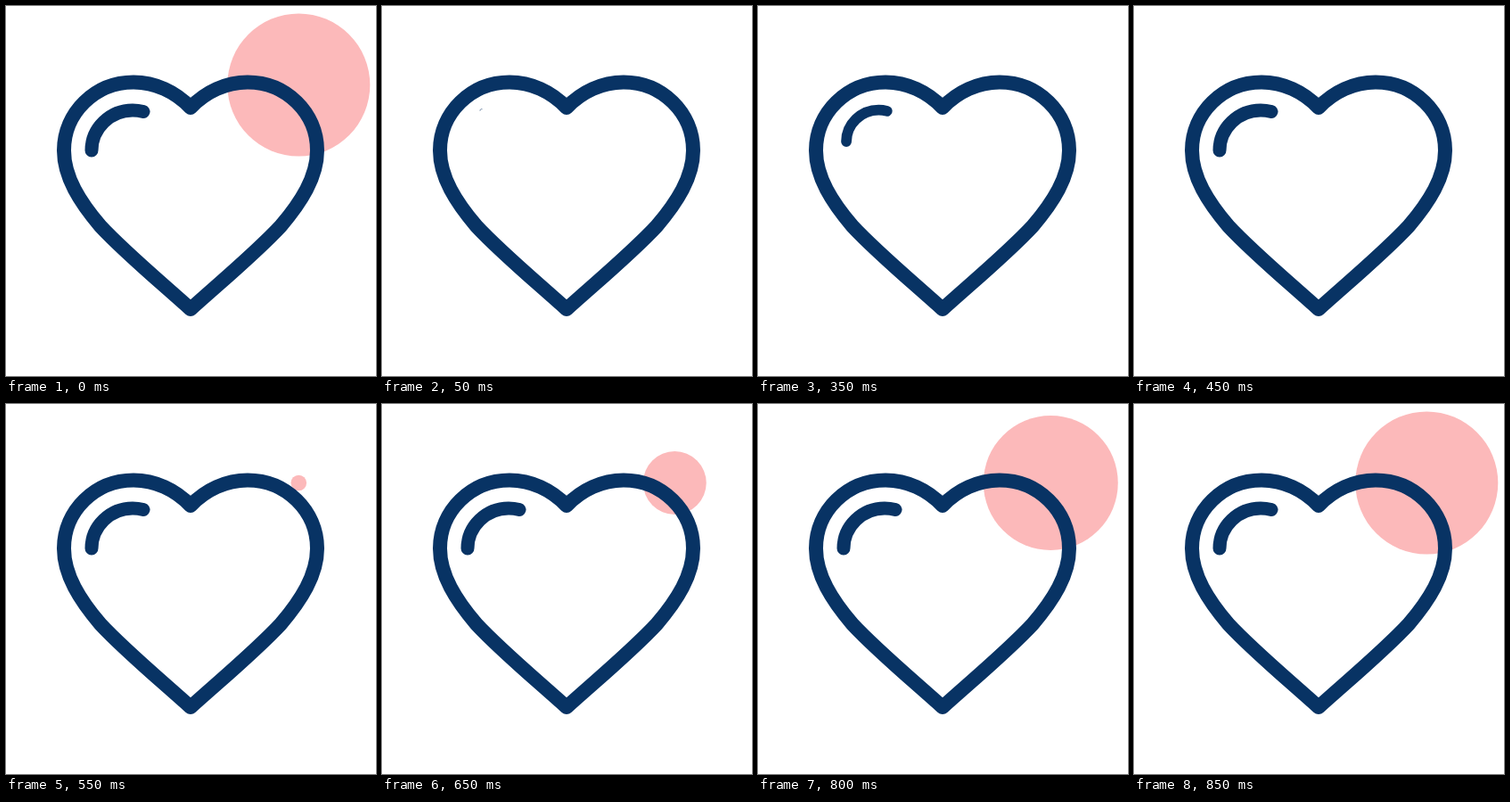
These frames come from a looping animation (415 px wide and 415 px high, 0.9 s). An HTML page with a canvas:

```html
<!DOCTYPE html>
<html lang="en">
<head>
<meta charset="utf-8">
<title>Heart</title>
<style>
  html, body { margin: 0; width: 100%; height: 100%; overflow: hidden; background: #fff; }
  canvas { display: block; width: 415px; height: 415px; }
</style>
</head>
<body>
<canvas id="stage" width="415" height="415"></canvas>
<script>
const ctx = document.getElementById('stage').getContext('2d');
const LOOP = 900, STEP = 50;
const NAVY = '#083364', PINK = '#fcb9ba';
const AXIS = 207;

const heartHalf = new Path2D(
  'M207 114 C190 96 167 85.5 143 85.5 C100 85.5 65 119.7 65 162 ' +
  'C65 192 83 220 106 247 C133 276 168 305 207 340');
const heart = new Path2D(heartHalf);
heart.addPath(heartHalf, new DOMMatrix([-1, 0, 0, 1, 2 * AXIS, 0]));

const shine = new Path2D('M96 162 C96 137 117 117 142 117 Q148 117 154 118.5');
const shineOrigin = { x: 110.5, y: 115.5 };

const progress = (t, start, duration) =>
  Math.min(1, Math.max(0, (t - start) / duration));

function strokePath(path, width) {
  ctx.strokeStyle = NAVY;
  ctx.lineWidth = width;
  ctx.lineCap = ctx.lineJoin = 'round';
  ctx.stroke(path);
}

function drawCircle(scale) {
  ctx.fillStyle = PINK;
  ctx.beginPath();
  ctx.arc(328.3, 88.5, 80 * scale, 0, 2 * Math.PI);
  ctx.fill();
}

function drawShine(scale) {
  if (scale <= 0) return;
  const { x, y } = shineOrigin;
  ctx.save();
  ctx.translate(x, y);
  ctx.scale(scale, scale);
  ctx.translate(-x, -y);
  strokePath(shine, 15);
  ctx.restore();
}

function draw(time) {
  const t = Math.floor((time % LOOP) / STEP) * STEP;
  const resting = t === 0; // the loop opens on the finished picture
  ctx.fillStyle = '#fff';
  ctx.fillRect(0, 0, 415, 415);
  drawCircle(resting ? 1 : progress(t, 517, 300));
  strokePath(heart, 16);
  drawShine(resting ? 1 : progress(t, 35, 400));
}

const start = performance.now();
function tick() {
  draw(performance.now() - start);
  requestAnimationFrame(tick);
}
tick();
</script>
</body>
</html>
```
